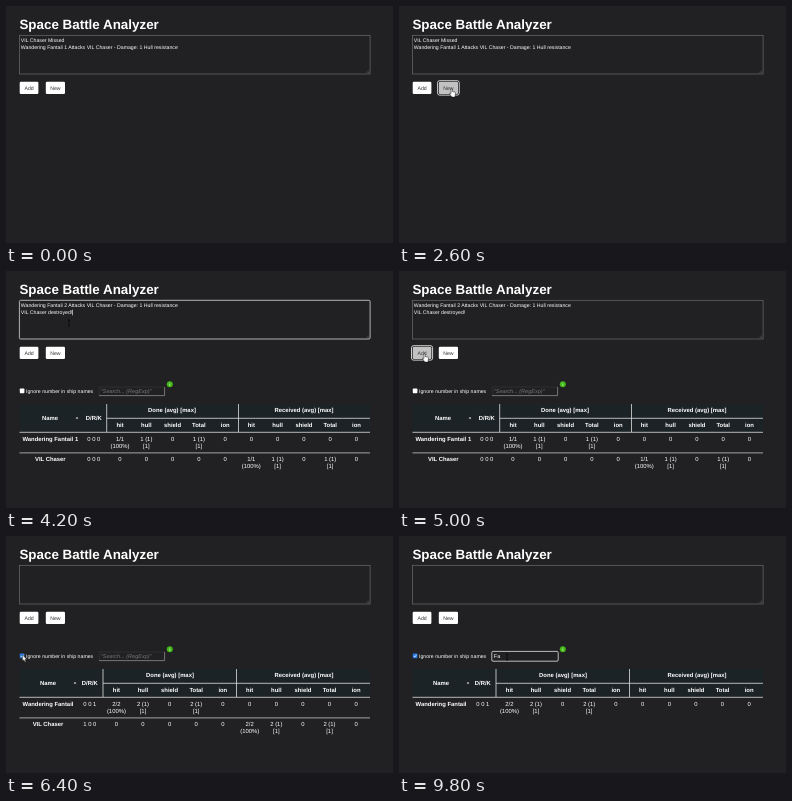
Animation, 387 px wide and 237 px high, one loop 10 s. Source, as an HTML page:

```html
<!DOCTYPE html>
<html lang="en">
<head>
<meta charset="utf-8">
<title>Space Battle Analyzer</title>
<style>
  html, body { margin: 0; width: 100%; height: 100%; overflow: hidden; background: #212022; }
  svg { display: block; width: 387px; height: 237px; font-family: "Liberation Sans", Arial, sans-serif; text-rendering: geometricPrecision; }
  text { fill: #fff; font-size: 5.2px; white-space: pre; }
  .table text { font-size: 5.9px; text-anchor: middle; }
  .bold { font-weight: bold; }
</style>
</head>
<body>
<svg id="stage" viewBox="0 0 387 237"></svg>
<script>
const LOOP = 10000, STEP = 200;
const SHIP = 'Wandering Fantail', FOE = 'VIL Chaser';
const stage = document.getElementById('stage');

// Each entry changes part of the state from its time on.
const steps = [
  [0, { lines: [`${FOE} Missed`, `${SHIP} 1 Attacks ${FOE} - Damage: 1 Hull resistance`], rows: null,
        focus: '', hover: '', down: '', caret: false, checked: false, query: '', cursor: null }],
  [1400, { cursor: ['arrow', 11, 66] }],
  [1600, { cursor: ['hand', 26, 83], hover: 'Add' }],
  [1800, { cursor: ['arrow', 36, 82], hover: '' }],
  [2000, { cursor: ['hand', 52, 82.5], hover: 'New' }],
  [2600, { focus: 'New', down: 'New' }],
  [2800, { down: '', lines: [], rows: 'first' }],
  [3000, { cursor: ['arrow', 57, 73], hover: '' }],
  [3200, { cursor: ['beam', 61, 58] }],
  [3400, { cursor: ['beam', 63, 52], focus: 'log', caret: true }],
  [4000, { lines: [`${SHIP} 2 Attacks ${FOE} - Damage: 1 Hull resistance`, `${FOE} destroyed!`] }],
  [4400, { cursor: ['beam', 54, 60] }],
  [4600, { cursor: ['arrow', 37, 73], caret: false }],
  [4800, { cursor: ['hand', 25, 82.5], hover: 'Add' }],
  [5000, { focus: 'Add', down: 'Add' }],
  [5200, { down: '', lines: [], rows: 'second' }],
  [5400, { cursor: ['arrow', 23, 92], hover: '' }],
  [5600, { cursor: ['arrow', 20, 106] }],
  [5800, { cursor: ['arrow', 17, 115] }],
  [6000, { cursor: ['arrow', 16.5, 119] }],
  [6200, { focus: '' }],
  [6400, { checked: true, rows: 'merged' }],
  [6800, { cursor: ['arrow', 45, 120] }],
  [7000, { cursor: ['arrow', 80, 120] }],
  [7200, { cursor: ['beam', 108, 121] }],
  [7400, { focus: 'search', caret: true }],
  [7600, { query: 'F' }],
  [8000, { query: 'Fa', rows: 'found' }],
  [8400, { caret: false }],
  [8800, { caret: true }],
  [9200, { caret: false }],
  [9600, { caret: true }],
  [9800, { caret: false }]
];

// name, D/R/K, hits done, hits received
const tables = {
  first: [[`${SHIP} 1`, '0 0 0', 1, 0], [FOE, '0 0 0', 0, 1]],
  second: [[`${SHIP} 1`, '0 0 0', 1, 0], [`${SHIP} 2`, '0 0 1', 1, 0], [FOE, '1 0 0', 0, 2]],
  merged: [[SHIP, '0 0 1', 2, 0], [FOE, '1 0 0', 0, 2]],
  found: [[SHIP, '0 0 1', 2, 0]]
};

const text = (x, y, s, attrs = '') => `<text x="${x}" y="${y}" ${attrs}>${s}</text>`;
const bold = (x, y, s) => text(x, y, s, 'class="bold"');
const box = (x, y, w, h, attrs) => `<rect x="${x}" y="${y}" width="${w}" height="${h}" ${attrs}/>`;
const path = (d, attrs) => `<path d="${d}" ${attrs}/>`;

function textarea(s) {
  const on = s.focus === 'log';
  let out = box(13.4, 29.3, 350.7, 38.7, on
    ? 'rx="1.2" fill="none" stroke="#d8d8d8" stroke-width=".8"'
    : 'fill="none" stroke="#6c6c6c" stroke-width=".7"');
  out += path('M360.5 67l2.5-2.5M362 67l1-1', 'stroke="#888" stroke-width=".4"');
  s.lines.forEach((line, i) => out += text(14.8, 35.9 + i * 7.4, line));
  if (on && s.caret) {
    const x = s.lines.length ? 66.4 : 15, y = s.lines.length ? 38.7 : 31.3;
    out += box(x, y, .6, 5.6, 'fill="#fff"');
  }
  return out;
}

function button(s, name, x, w) {
  const down = s.down === name, ring = s.focus === name;
  const fill = down ? '#c2c2c2' : s.hover === name ? '#e3e3e3' : '#fff';
  return (ring ? box(x - 1.2, 74.7, w + 2.4, 14.4, 'rx="2" fill="#111" stroke="#fff" stroke-width=".8"') : '') +
    box(x, 75.8, w, 12.2, `rx="1.2" fill="${fill}"`) +
    text(x + w / 2, 83.8, name, 'text-anchor="middle" style="fill:#333"');
}

function filters(s) {
  const on = s.focus === 'search';
  let out = box(13.8, 117.6, 4.6, 4.6, `rx=".7" fill="${s.checked ? '#2f7de1' : '#fff'}"`);
  if (s.checked) out += path('M14.8 120l1 1 1.8-2.2', 'fill="none" stroke="#fff" stroke-width=".7"');
  out += text(20, 122.3, 'Ignore number in ship names');
  out += on
    ? box(92.8, 115.4, 66.4, 9.8, 'rx="1.2" fill="#212022" stroke="#e4e4e4" stroke-width=".8"')
    : path('M93.3 124.5V116H158.5', 'fill="none" stroke="#383838" stroke-width=".6"') +
      path('M93 124.6H158.6V116', 'fill="none" stroke="#999" stroke-width=".7"');
  out += s.query
    ? text(94.8, 122.3, s.query, 'style="font-size:5.5px"')
    : text(94.8, 122.3, '"Search... (RegExp)"', 'font-style="italic" style="fill:#777;font-size:5.5px"');
  if (on && s.caret) out += box(94.8 + s.query.length * 3.2, 117.6, .6, 5.6, 'fill="#fff"');
  out += '<circle cx="163.8" cy="113.3" r="3" fill="#43b718"/>';
  return out + text(163.8, 114.9, 'i', 'class="bold" text-anchor="middle" style="font-size:4.5px;fill:#e8ffe0"');
}

function stats(x, gap, y, hits) {
  const cells = hits
    ? [[`${hits}/${hits}`, '(100%)'], [`${hits} (1)`, '[1]'], ['0'], [`${hits} (1)`, '[1]'], ['0']]
    : Array(5).fill(['0']);
  return cells.map((cell, i) => cell.map((line, j) => text(x + i * gap, y + j * 7.1, line)).join('')).join('');
}

function table(s) {
  if (!s.rows) return '';
  const slim = s.checked;
  const name = slim ? 42 : 44, drk = slim ? 83.8 : 87.8;
  const left = slim ? 97 : 100.7, mid = slim ? 230.5 : 232.5;
  const gap = slim ? 26.6 : 26.3;
  const groups = [['Done', slim ? 110.4 : 114, slim ? 164 : 166], ['Received', slim ? 243.7 : 245.3, 298]];
  let out = box(13.5, 133, 350.5, 28, 'fill="#1c2326"');
  out += path(`M${left} 133V161M${mid} 133V161M${left} 147.3H364M13.5 161.3H364`,
    'fill="none" stroke="#ddd" stroke-width=".8"');
  out += bold(name, 149, 'Name') + bold(drk, 149, 'D/R/K');
  out += path(`M${name + 25.6} 147.4h2.8l-1.4-1.5z`, 'fill="#fff"');
  for (const [label, x, centre] of groups) {
    out += bold(centre, 141.2, `${label} (avg) [max]`);
    ['hit', 'hull', 'shield', 'Total', 'ion'].forEach((h, i) => out += bold(x + i * gap, 156.2, h));
  }
  tables[s.rows].forEach(([ship, tally, done, got], i) => {
    const y = 170 + i * 20.3;
    if (i) out += path(`M13.5 ${y - 8.4}H364`, 'stroke="#ddd" stroke-width=".7"');
    out += bold(slim ? 42 : 44.3, y, ship) + text(drk, y, tally);
    out += stats(groups[0][1], gap, y, done) + stats(groups[1][1], gap, y, got);
  });
  return `<g class="table">${out}</g>`;
}

const shapes = {
  arrow: path('M0 0v6l1.4-1.2 1 2.2 1-.5-1-2.1H4.3z', 'fill="#fff" stroke="#111" stroke-width=".4"'),
  hand: path('M0 .7Q.7-.3 1.3.7V3l2.6.7q.8.3.6 1.3L4 8.6H.8L-1.6 5q.2-.9 1.6 0z',
    'fill="#fff" stroke="#111" stroke-width=".5"'),
  beam: path('M-1-3H1M0-3V3M-1 3H1', 'fill="none" stroke="#050505" stroke-width=".7"')
};

function pointer({ cursor }) {
  if (!cursor) return '';
  const [kind, x, y] = cursor;
  return `<g transform="translate(${x} ${y})">${shapes[kind]}</g>`;
}

const stateAt = t => Object.assign({}, ...steps.filter(([at]) => at <= t).map(([, change]) => change));

function draw(t) {
  const s = stateAt(t);
  stage.innerHTML = text(13.4, 23, 'Space Battle Analyzer', 'class="bold" style="font-size:13.4px"') +
    textarea(s) + button(s, 'Add', 13.7, 18.7) + button(s, 'New', 39.8, 19.2) +
    (s.rows ? filters(s) : '') + table(s) + pointer(s);
}

const start = performance.now();
let shown = -1;
function tick() {
  const t = Math.max(0, performance.now() - start) % LOOP;
  const step = Math.floor(t / STEP);
  if (step !== shown) draw((shown = step) * STEP);
  requestAnimationFrame(tick);
}
tick();
</script>
</body>
</html>
```
